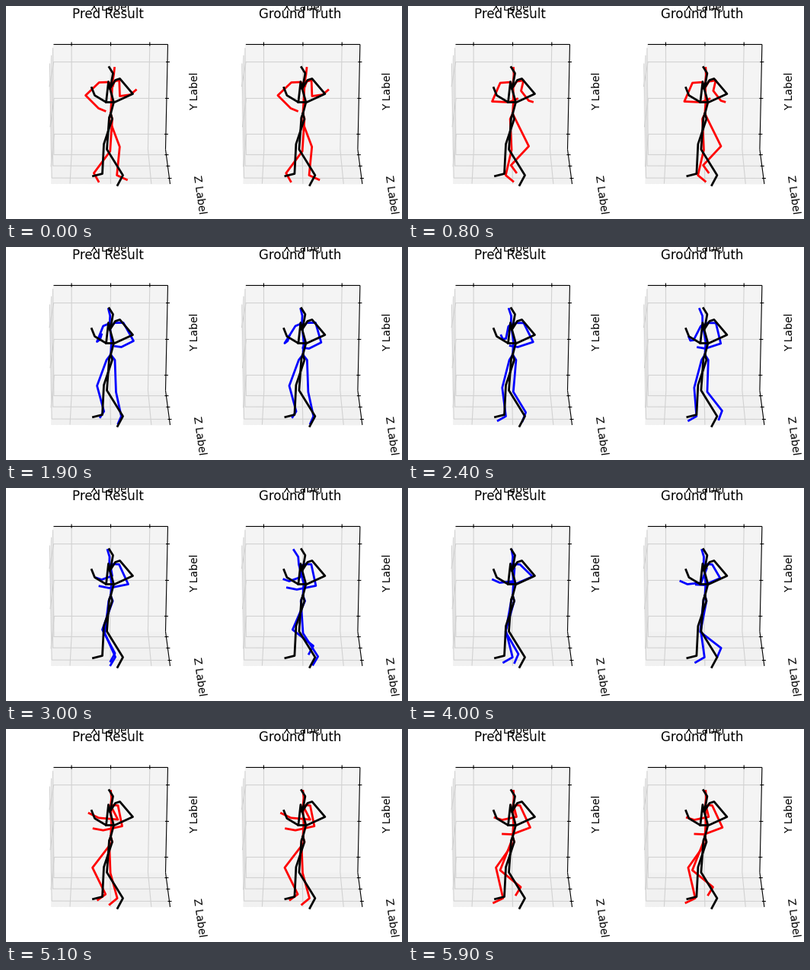
Write a matplotlib script that moves like this. It is 520x280 px and loops after 6000 ms.

```python
import numpy as np
import matplotlib.pyplot as plt
from matplotlib.animation import FuncAnimation

W, H, DPI = 520, 280, 100
FRAMES, STEP = 60, 100
OBSERVED, RESTART = 10, 50   # red, then blue from OBSERVED, red again from RESTART
SHIFT = 252.4                # distance between the two panels
ROOT = np.array((137, 141))

plt.rcParams["font.family"] = "DejaVu Sans"
fig = plt.figure(figsize=(W / DPI, H / DPI), dpi=DPI, facecolor="white")
ax = fig.add_axes([0, 0, 1, 1])
ax.set(xlim=(0, W), ylim=(H, 0))
ax.axis("off")


def line(points, dx, color, width, z, cap="butt"):
    p = np.array(points, float) + (dx + 0.5, 0.5)
    return ax.plot(p[:, 0], p[:, 1], color=color, lw=width, zorder=z,
                   solid_capstyle=cap, snap=False)[0]


def mix(a, b, t):
    return np.add(a, t * np.subtract(b, a))


# Box corners: F/N = far/near, T/B = top/bottom, L/R = left/right
FTL, FTR, FBL, FBR = (62, 50), (212, 50), (63, 188), (209, 188)
NTL, NBL, NBR = (56, 80), (59, 233), (215, 233.5)
X_TICKS = (0.157, 0.5, 0.842)
Y_TICKS = (0.167, 0.514, 0.855)
Z_TICKS = (0.155, 0.48, 0.835)


def draw_box(dx):
    for corners, shade in (((FTL, FBL, NBL, NTL), "#f7f7f7"),
                           ((FBL, FBR, NBR, NBL), "#f1f1f1"),
                           ((FTL, FTR, FBR, FBL), "#f4f4f4")):
        ax.add_patch(plt.Polygon(np.add(corners, (dx + 0.5, 0.5)),
                                 fc=shade, ec=shade, lw=0.6))
    walls = ((X_TICKS, ((FTL, FTR), (FBL, FBR), (NBL, NBR))),
             (Y_TICKS, ((FTR, FBR), (FTL, FBL), (NTL, NBL))),
             (Z_TICKS, ((FBR, NBR), (FBL, NBL), (FTL, NTL))))
    for ticks, edges in walls:
        for t in ticks:
            line([mix(a, b, t) for a, b in edges], dx, "#d2d2d2", 0.8, 2)
    for a, b, ticks, tick in ((FTL, FTR, X_TICKS, ((0, -3), (0, 2))),
                              (FTR, FBR, Y_TICKS, ((-2, 0), (3, 0))),
                              (FBR, NBR, Z_TICKS, ((-2, 0), (3, 0)))):
        line([a, b], dx, "black", 0.8, 3)
        for t in ticks:
            line(mix(a, b, t) + tick, dx, "black", 0.8, 3)


def draw_text(dx, title):
    ax.text(134 + dx, 16, title, size=12, ha="center", va="baseline", zorder=8)
    ax.text(137 + dx, 6, "X Label", size=10, ha="center", va="baseline", zorder=8)
    for x, y, name, angle in ((248.2, 111.5, "Y Label", 90),
                              (253.5, 248.2, "Z Label", -82)):
        ax.text(x + dx, y, name, size=10, rotation=angle, ha="center",
                va="center", zorder=8)


# The first pose stays visible in black
STILL = [
    [(135, 80), (140, 88), (138, 99), (136, 108), (141, 126), ROOT],
    [(136, 108), (134, 99), (131, 126), (116, 117), (112, 107)],
    [(136, 108), (143, 97), (149, 95), (166, 115), (142, 126), (131, 126)],
    [ROOT, (139, 148), (128, 181), (126, 220), (114, 223)],
    [ROOT, (135, 146), (132, 188), (153, 222), (146, 235)],
]

# Key times; the one-frame gap before RESTART is the hard cut
KEYS = (0, 8, 19, 30, 40, 49, 50, 59)
TURN = np.radians((0, 20, 120, 170, 180, 180, 180, 180))
LEAN = (5, 1, -3, -12, -4, -2, 0, 1)
STRIDES = {1: (0.5, 0.8, 1.4, 1.73, 2.25, 2.7, 2.9, 3.02),
           -1: (0.17, 0.32, 0.9, 1.48, 1.62, 2.1, 2.28, 2.75)}
# (elbow x, elbow y, wrist x, wrist y) at the key times
ARMS = {-1: ((104, 117, 121, 134), (110, 125, 132, 126), (119, 124, 123, 121),
             (139, 115, 125, 120), (138, 122, 120, 124), (139, 118, 124, 121),
             (147, 119, 121, 116), (142, 115, 123, 119)),
        1: ((149, 118, 163, 116), (148, 111, 158, 124), (167, 123, 151, 131),
            (160, 126, 135, 131), (163, 116, 142, 125), (160, 123, 136, 130),
            (151, 127, 126, 132), (160, 129, 136, 138))}


def at(frame, values):
    return np.interp(frame, KEYS, values)


def wave(phase, peak):
    return np.cos(2 * np.pi * (phase - peak))


def spine(lean):
    return [(137 + lean, 81), (138 + 0.6 * lean, 90), (137 + 0.45 * lean, 100),
            (138, 125), ROOT]


def arm(frame, side, turn, lean, drift):
    chest = np.array((138 + 0.3 * lean, 105))
    spread = 17 * np.cos(0.65 * (turn - np.pi / 3))
    shoulder = np.array((135 + 8 * turn / np.pi + side * spread,
                         98.5 - 1.5 * side + (4 - side) * turn / np.pi))
    joints = [at(frame, track) for track in zip(*ARMS[side])]
    elbow, wrist = np.reshape(joints, (2, 2)) + drift * np.array((-6, 2))
    hand = wrist + 0.5 * (wrist - elbow) - (0, 5)
    return [chest, mix(chest, shoulder, 0.3) - (0, 4), shoulder, elbow, wrist, hand]


def leg(frame, side, turn, swing):
    """Walking cycle: the foot lands at phase 0 and lifts off at about 0.5."""
    phase = at(frame, STRIDES[side])
    ahead, apart = np.cos(turn), side * np.sin(turn)

    def joint(forward, y):
        return np.array((ROOT[0] + ahead * forward + 7 * apart, y))

    hip = ROOT + (2 * side + 4 * apart, 7)
    knee = joint(11 + 13 * swing * wave(phase, 0.93),
                 186 - 4.5 * wave(phase, 0.97))
    lift = 15 * swing * max(0, wave(phase, 0.72))
    ankle = joint(-5 * swing + 18 * swing * wave(phase, 0.05), 222 - lift)
    toe = ankle + (ahead * (9 + 4 * wave(phase, 0.12)),
                   8.5 - 3 * wave(phase, 0.1))
    return [ROOT, hip, knee, ankle, toe]


def body(frame, predicted):
    # The prediction fades to a mean gait while the true pose drifts away
    swing = np.interp(frame, (19, 30, 49, 50), (1, 0.35, 0.35, 1)) if predicted else 1
    drift = 0 if predicted else np.interp(frame, (OBSERVED, 19, 49, 50), (0, 1, 1, 0))
    turn, lean = at(frame, TURN), at(frame, LEAN) * swing
    return ([spine(lean)]
            + [arm(frame, side, turn, lean, drift) for side in (-1, 1)]
            + [leg(frame, side, turn, swing) for side in (-1, 1)])


panels = []
for dx, title in ((0, "Pred Result"), (SHIFT, "Ground Truth")):
    draw_box(dx)
    draw_text(dx, title)
    for chain in STILL:
        line(chain, dx, "black", 2, 6, "projecting")
    limbs = [line([ROOT, ROOT], dx, "red", 2, 5, "projecting") for _ in STILL]
    panels.append((dx, limbs))


def update(frame):
    color = "blue" if OBSERVED <= frame < RESTART else "red"
    for dx, limbs in panels:
        for artist, chain in zip(limbs, body(frame, dx == 0)):
            p = np.array(chain) + (dx + 0.5, 0.5)
            artist.set_data(p[:, 0], p[:, 1])
            artist.set_color(color)
    return [artist for _, limbs in panels for artist in limbs]


anim = FuncAnimation(fig, update, frames=FRAMES, interval=STEP, repeat=True,
                     repeat_delay=0, init_func=lambda: update(0))
plt.show()
```
